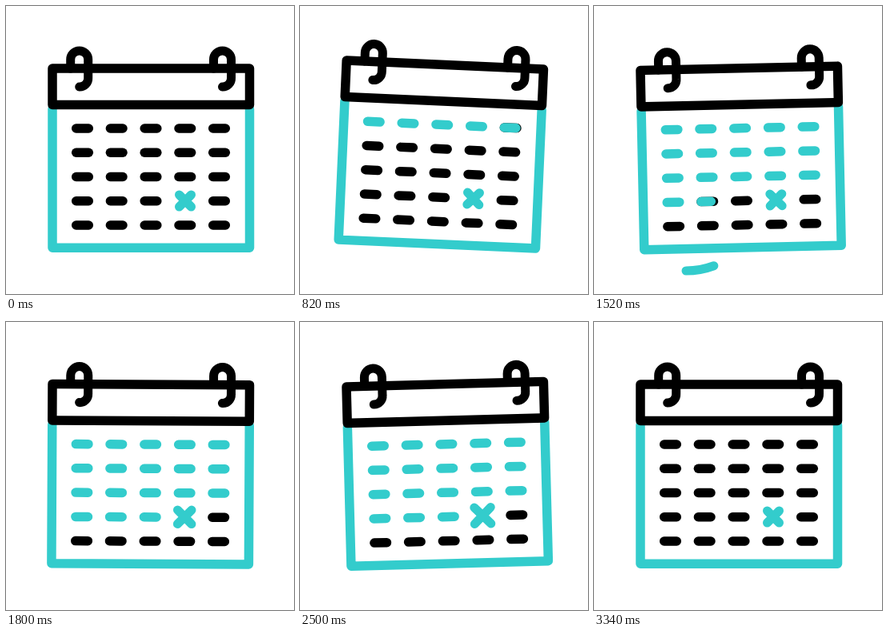
Animation, 360 px wide and 360 px high, one loop 3600 ms. Source, as an HTML page with a canvas:

```html
<!DOCTYPE html>
<html lang="en">
<head>
<meta charset="utf-8">
<title>Calendar</title>
<style>
html, body { margin: 0; width: 100%; height: 100%; overflow: hidden; background: #fff; }
canvas { display: block; }
</style>
</head>
<body>
<canvas id="stage" width="360" height="360"></canvas>
<script>
const ctx = document.getElementById('stage').getContext('2d');
const LOOP = 3600, TEAL = '#33cccc', BLACK = '#000', RAD = Math.PI / 180;
const PIVOT = [170, 80];
const COLS = [95.5, 138.2, 181, 223.8, 266.5];
const ROWS = [153, 183.2, 213.5, 243.8, 274];
const MARK = 18, HALF = 7.8;      // index of the crossed day, half length of a dash
const FILL_START = 530, FILL_STEP = 59;

// [time, value] turning points, joined by sine easing
const LIFT = [[260, 0], [490, -21], [1110, 8], [1480, 0]];
const TILT = [[500, 0], [850, 2.6], [1340, -3], [1730, 1], [1985, -3],
              [2225, 3], [2600, -2.4], [2700, 0]];
const CROSS = [[1680, 7.5], [2060, 13], [2300, 13], [2700, 7.5]];

const ramp = (t, a, b) => Math.min(1, Math.max(0, (t - a) / (b - a)));

function follow(keys, t) {
  let value = keys[0][1];
  for (let i = 1; i < keys.length; i++) {
    const p = ramp(t, keys[i - 1][0], keys[i][0]);
    value += (keys[i][1] - keys[i - 1][1]) * (1 - Math.cos(Math.PI * p)) / 2;
  }
  return value;
}

function stroke(path, color, width = 11.5) {
  ctx.strokeStyle = color;
  ctx.lineWidth = width;
  ctx.stroke(new Path2D(path));
}

function drawDays(t) {
  const keep = 1 - ramp(t, 2960, 3340);
  const done = `rgb(${51 * keep},${204 * keep},${204 * keep})`;
  ROWS.forEach((y, r) => COLS.forEach((x, c) => {
    const i = r * 5 + c;
    if (i === MARK) return;
    const start = FILL_START + i * FILL_STEP;
    const p = i < MARK ? ramp(t, start, start + FILL_STEP) : 0;
    const left = x - HALF;
    if (p < 1) stroke(`M${left} ${y}h${2 * HALF}`, BLACK);
    if (p > 0) stroke(`M${left} ${y}h${2 * HALF * p}`, done);
  }));
}

function drawCalendar(t) {
  ctx.save();
  ctx.translate(PIVOT[0], PIVOT[1] + follow(LIFT, t));
  ctx.rotate(follow(TILT, t) * RAD);
  ctx.translate(-PIVOT[0], -PIVOT[1]);
  stroke('M58 129V302.3H304.5V129', TEAL);
  stroke('M58 78H304.5V123.5H58Z', BLACK);
  for (const x of [80.7, 259.5])
    stroke(`M${x} 78V67a11 11 0 0 1 22 0V90a10.5 10.5 0 0 1-11 11`, BLACK, 11);
  drawDays(t);
  const s = follow(CROSS, t);
  stroke(`M${224 - s} ${243.5 - s}l${2 * s} ${2 * s}m0 ${-2 * s}l${-2 * s} ${2 * s}`, TEAL, 11);
  ctx.restore();
}

function drawTrail(t) {
  const angle = p => (158.3 - 88.7 * p) * RAD;
  const head = ramp(t, 940, 1200), tail = ramp(t, 1340, 1575);
  if (head <= tail) return;
  ctx.strokeStyle = TEAL;
  ctx.lineWidth = 11;
  ctx.beginPath();
  ctx.arc(115, 231, 100, angle(tail), angle(head), true);
  ctx.stroke();
}

function frame(now) {
  const t = now % LOOP;
  ctx.fillStyle = '#fff';
  ctx.fillRect(0, 0, 360, 360);
  ctx.lineCap = ctx.lineJoin = 'round';
  drawCalendar(t);
  drawTrail(t);
  requestAnimationFrame(frame);
}
frame(performance.now());
</script>
</body>
</html>
```
